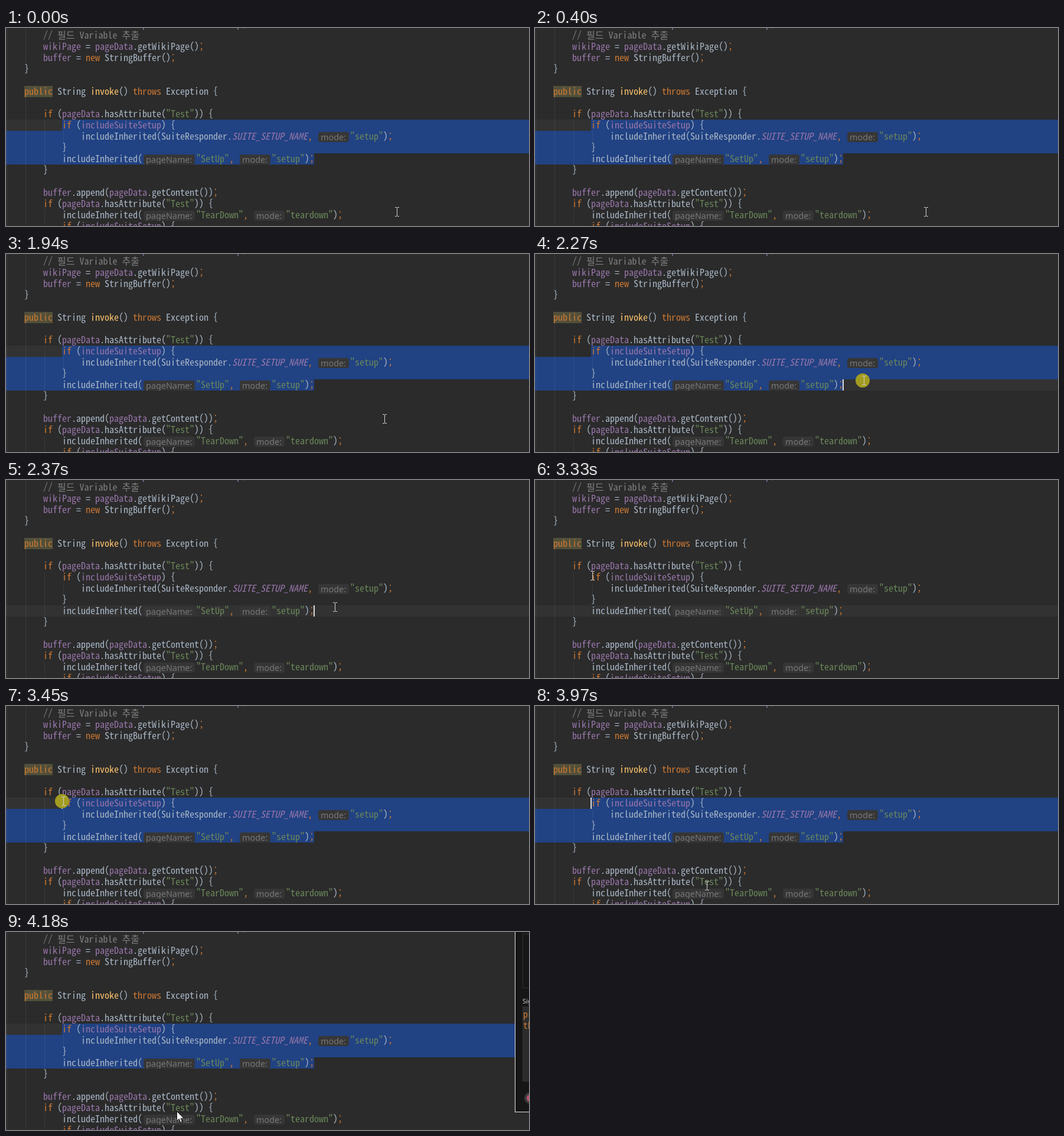
Write an HTML page that moves like this. It is 886x335 px and loops after 8 s.

```html
<!DOCTYPE html>
<html lang="ko">
<head>
<meta charset="utf-8">
<title>Code editor</title>
<style>
html, body { margin: 0; width: 100%; height: 100%; overflow: hidden; background: #2b2b2b; }
svg { display: block; }
#stage { position: absolute; left: 0; top: 0; }

text { font-family: "Noto Sans Mono CJK KR", "Noto Sans Mono CJK JP", "Noto Sans Mono", monospace; font-size: 16px; fill: #a9b7c6; }
.keyword, .mark { fill: #cc7832; }
.string { fill: #6a8759; }
.field { fill: #9876aa; }
.constant { fill: #9876aa; font-style: italic; }
.method { fill: #ffc66d; }
.comment { fill: #808080; }
.hint { font: 14.4px "Noto Sans", "Open Sans", sans-serif; fill: #787878; }
.title { font: 11px "Noto Sans", "Open Sans", sans-serif; fill: #d0d0d0; }
.row { fill: #323232; }
.caret { fill: #dcdcdc; }

/* One shared 8 s clock; every change is a hard step. */
.step { animation: 8s step-end infinite; }
#selection { animation-name: selection; }
#rowStart { animation-name: row-start; }
#rowEnd { animation-name: row-end; }
#caretStart { animation-name: caret-start; }
#caretEnd { animation-name: caret-end; }
#popup, #arrow { animation-name: popup; }
#beam { animation-name: beam; }
#spot { animation-name: spot; }
#pointer { animation-name: pointer; }

@keyframes selection { 0%, 43.125%, 100% { opacity: 1 } 29.625% { opacity: 0 } }
@keyframes row-start { 0%, 43.125%, 100% { opacity: 1 } 28.375% { opacity: 0 } }
@keyframes row-end { 0%, 43.125%, 100% { opacity: 0 } 28.375% { opacity: 1 } }
@keyframes caret-start { 0%, 52.25%, 100% { opacity: 0 } 43.125% { opacity: 1 } }
@keyframes caret-end { 0%, 34.875%, 100% { opacity: 0 } 28.375% { opacity: 1 } }
@keyframes popup { 0% { opacity: 0 } 52.25%, 100% { opacity: 1 } }
@keyframes beam { 0% { opacity: 1 } 52.25%, 100% { opacity: 0 } }
@keyframes spot { 0%, 29.625%, 44.25%, 100% { opacity: 0 } 28.375%, 43.125% { opacity: 1 } }
@keyframes pointer {
  0% { transform: translate(662px, 311px) }
  24.25% { transform: translate(641px, 279px) }
  25.375% { transform: translate(598px, 240px) }
  26.875% { transform: translate(557px, 215px) }
  28.375% { transform: translate(557px, 214px) }
  29.625% { transform: translate(557px, 215px) }
  31.125% { transform: translate(550px, 214px) }
  32.5% { transform: translate(520px, 211px) }
  33.75% { transform: translate(455px, 203px) }
  34.875% { transform: translate(370px, 193px) }
  36.25% { transform: translate(280px, 183px) }
  37.5% { transform: translate(200px, 174px) }
  38.875% { transform: translate(140px, 167px) }
  40.25% { transform: translate(108px, 163px) }
  41.625% { transform: translate(97px, 162px) }
  43.125% { transform: translate(97px, 161px) }
  44.25% { transform: translate(225px, 248px) }
  45.75% { transform: translate(291px, 303px) }
  49.625% { transform: translate(291px, 304px) }
  52.25%, 100% { transform: translate(289px, 303px) }
}
</style>
</head>
<body>
<svg id="stage" width="886" height="335" viewBox="0 0 886 335">
  <rect width="886" height="335" fill="#2b2b2b"/>
  <rect id="rowStart" class="row step" y="155" width="886" height="19"/>
  <rect id="rowEnd" class="row step" y="212" width="886" height="19"/>
  <path id="selection" class="step" fill="#214283" d="M95 155H886V212H522V231H0V174H95Z"/>
  <path stroke="#fff" stroke-opacity=".07" d="M1.5 0V335M33.5 0V60M33.5 117V335M65.5 155V231M65.5 307V335M97.5 174V193"/>
  <rect x="31" y="98" width="48" height="19" fill="#52503a"/>
  <g id="code"></g>
  <rect id="caretStart" class="caret step" x="94" y="155" width="2" height="19"/>
  <rect id="caretEnd" class="caret step" x="521" y="212" width="2" height="19"/>

  <g id="popup" class="step">
    <rect x="862.5" y="-2" width="40" height="306.5" fill="#161616" stroke="#e6e6e6"/>
    <rect x="875.5" y="3.5" width="30" height="91" fill="#161616" stroke="#303030"/>
    <text class="title" x="875" y="121">Signature preview</text>
    <rect x="875.5" y="126.5" width="30" height="126" fill="#2b2b2b" stroke="#303030"/>
    <text class="keyword" x="876" y="145">private</text>
    <text class="keyword" x="876" y="164">throws</text>
    <circle cx="888" cy="281" r="10" fill="#3c3c3c"/>
    <circle cx="888" cy="281" r="6" fill="#c0506e"/>
  </g>

  <g id="pointer" class="step">
    <circle id="spot" class="step" cx="-2" r="12" fill="#a29c20"/>
    <path id="beam" class="step" fill="none" stroke="#d4d4d4" d="M-3 -7.5H0M1 -7.5H4M.5 -7V7M-3 7.5H0M1 7.5H4"/>
    <path id="arrow" class="step" fill="#fff" stroke="#000" stroke-width=".8" d="M.5 .5V16.5L4.2 13 6.6 19 9.2 17.9 6.8 12.2H12Z"/>
  </g>
</svg>
<script>
const NS = "http://www.w3.org/2000/svg";
const CELL = 8, ROW = 19, TOP = 3;
const HINT_WIDTH = { "pageName:": 91, "mode:": 56 };

// [row, left edge, text]
const lines = [
  [-1, 63, 'this.includeSuiteSetup = includeSuiteSetup;'],
  [0, 63, '// 필드 Variable 추출'],
  [1, 63, 'wikiPage = pageData.getWikiPage();'],
  [2, 63, 'buffer = new StringBuffer();'],
  [3, 31, '}'],
  [5, 31, 'public String invoke() throws Exception {'],
  [7, 63, 'if (pageData.hasAttribute("Test")) {'],
  [8, 95, 'if (includeSuiteSetup) {'],
  [9, 127, 'includeInherited(SuiteResponder.SUITE_SETUP_NAME, mode: "setup");'],
  [10, 95, '}'],
  [11, 95, 'includeInherited(pageName: "SetUp", mode: "setup");'],
  [12, 63, '}'],
  [14, 63, 'buffer.append(pageData.getContent());'],
  [15, 63, 'if (pageData.hasAttribute("Test")) {'],
  [16, 95, 'includeInherited(pageName: "TearDown", mode: "teardown");'],
  [17, 95, 'if (includeSuiteSetup) {']
];

const styles = [
  ["comment", /^\/\//],
  ["string", /^"/],
  ["keyword", /^(public|throws|if|new|this)$/],
  ["field", /^(wikiPage|pageData|buffer|includeSuiteSetup)$/],
  ["constant", /^[A-Z]+_[A-Z_]+$/],
  ["method", /^invoke$/],
  ["mark", /^[;,]$/]
];
const tokenPattern = /\/\/.*|"[^"]*"|\w+: |\w+|[;,]|\s+|[^\s\w;,"]+/g;

function add(parent, tag, attrs, content = "") {
  const node = document.createElementNS(NS, tag);
  for (const key in attrs) node.setAttribute(key, attrs[key]);
  node.textContent = content;
  return parent.appendChild(node);
}

// Font size that gives the grid's 8 px advance.
function gridFontSize() {
  const pen = document.createElement("canvas").getContext("2d");
  const family = getComputedStyle(document.querySelector("#popup .keyword")).fontFamily;
  pen.font = "100px " + family;
  return CELL / pen.measureText("m").width * 100;
}

function drawHint(parent, x, top, label) {
  const width = HINT_WIDTH[label];
  const box = add(parent, "svg", { x: x + 2, y: top + 2, width: width - 4, height: 17 });
  add(box, "rect", { width: width - 4, height: 17, rx: 4, fill: "#363636" });
  add(box, "text", { class: "hint", x: 4, y: 14 }, label);
  return width;
}

function drawLine([row, x, text]) {
  const top = TOP + row * ROW;
  for (const token of text.match(tokenPattern)) {
    if (/^\w+: $/.test(token)) {
      x += drawHint(code, x, top, token.trim());
      continue;
    }
    if (token.trim()) {
      const style = styles.find(([, pattern]) => pattern.test(token));
      add(code, "text", { class: style ? style[0] : "plain", x, y: top + 15, style: `font-size:${size}px` }, token);
    }
    x += token.length * CELL;
  }
}

const code = document.getElementById("code");
const size = gridFontSize();
lines.forEach(drawLine);
</script>
</body>
</html>
```
